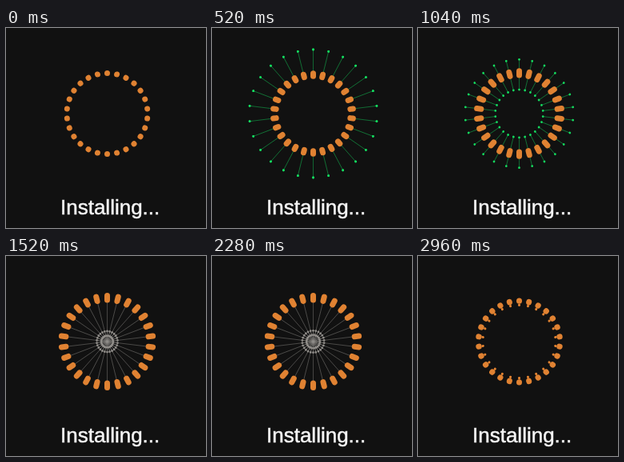
These frames come from a looping animation (250 px wide and 250 px high, 3000 ms). An HTML page:

```html
<!DOCTYPE html>
<html lang="en">
<head>
<meta charset="utf-8">
<title>Installing</title>
<style>
  html, body { margin: 0; width: 100%; height: 100%; overflow: hidden; background: #111; }
  svg { display: block; width: 100vw; height: 100vh; }
  text {
    font: 26px "Liberation Sans", Arial, sans-serif;
    fill: #f6f6f6; stroke: #f6f6f6; stroke-width: .5px;
  }
</style>
</head>
<body>
<svg viewBox="0 0 250 250">
  <defs>
    <g id="spoke">
      <line id="thread" stroke-width=".65" stroke-opacity=".65"/>
      <circle id="lead" r="1.4"/>
      <circle id="trail" r="1.4"/>
      <line id="bead" stroke="#e08232" stroke-width="7" stroke-linecap="round"/>
    </g>
  </defs>
  <g id="ring" transform="translate(126.5 107)"></g>
  <text x="68" y="233">Installing...</text>
</svg>
<script>
const LOOP = 3000, STEP = 40, SPOKES = 26;
const RADIUS = 50.5, LAG = 70, RETURN = 2240;
const ORANGE = [224, 130, 50], GREEN = [20, 220, 95], GRAY = [145, 142, 138];
const $ = id => document.getElementById(id);

const linear = p => p;
const sine = p => (1 - Math.cos(Math.PI * p)) / 2;
const cubic = p => p < .5 ? 4 * p ** 3 : 1 - 4 * (1 - p) ** 3;
const easeOut = p => 1 - (1 - p) ** 2;
const easeIn = p => p ** 1.5;

// Runs a value through moves of the form [from ms, to ms, goal, easing]
function follow(value, moves, t) {
  for (const [from, to, goal, ease] of moves) {
    const p = Math.min(1, Math.max(0, (t - from) / (to - from)));
    value += (goal - value) * ease(p);
  }
  return value;
}

// Signed distance of a dot: out, wind up, through the centre, drift, home
function reach(t, lag, hold) {
  return follow(RADIUS, [
    [0, 420, 80, cubic],
    [600, 850, 98.5, sine],
    [850, 1180, hold, sine],
    [1180, RETURN - LAG, hold - 2, sine],
    [RETURN, LOOP, RADIUS, easeIn]
  ], t < RETURN ? t - lag : t);
}

function tint(t) {
  const channels = ORANGE.map((value, c) => follow(value, [
    [0, 120, GREEN[c], linear],
    [1080, 1240, GRAY[c], linear],
    [2600, 2920, ORANGE[c], linear]
  ], t));
  return `rgb(${channels.map(Math.round)})`;
}

function set(el, attrs) {
  for (const name in attrs) el.setAttribute(name, attrs[name]);
}

for (let k = 0; k < SPOKES; k++) {
  const use = document.createElementNS("http://www.w3.org/2000/svg", "use");
  set(use, { href: "#spoke", transform: `rotate(${k * 360 / SPOKES})` });
  $("ring").append(use);
}

function draw(t) {
  const lead = reach(t, 0, -12.5), trail = reach(t, LAG, -7);
  // The bead leans away from the dots
  const mid = RADIUS - .07 * ((lead + trail) / 2 - RADIUS);
  const half = follow(0, [[0, 1300, 2.75, easeOut], [RETURN, LOOP, 0, easeIn]], t);
  const color = tint(t);
  set($("thread"), { y1: -Math.min(lead, trail, mid), y2: -Math.max(lead, trail, mid), stroke: color });
  set($("lead"), { cy: -lead, fill: color });
  set($("trail"), { cy: -trail, fill: color });
  // A tiny extra length keeps the round caps visible when the bead is a dot
  set($("bead"), { y1: -mid - half - .01, y2: -mid + half });
}

const start = performance.now();
function tick() {
  const t = (performance.now() - start) % LOOP;
  draw(Math.floor(t / STEP) * STEP);
  requestAnimationFrame(tick);
}
tick();
</script>
</body>
</html>
```
